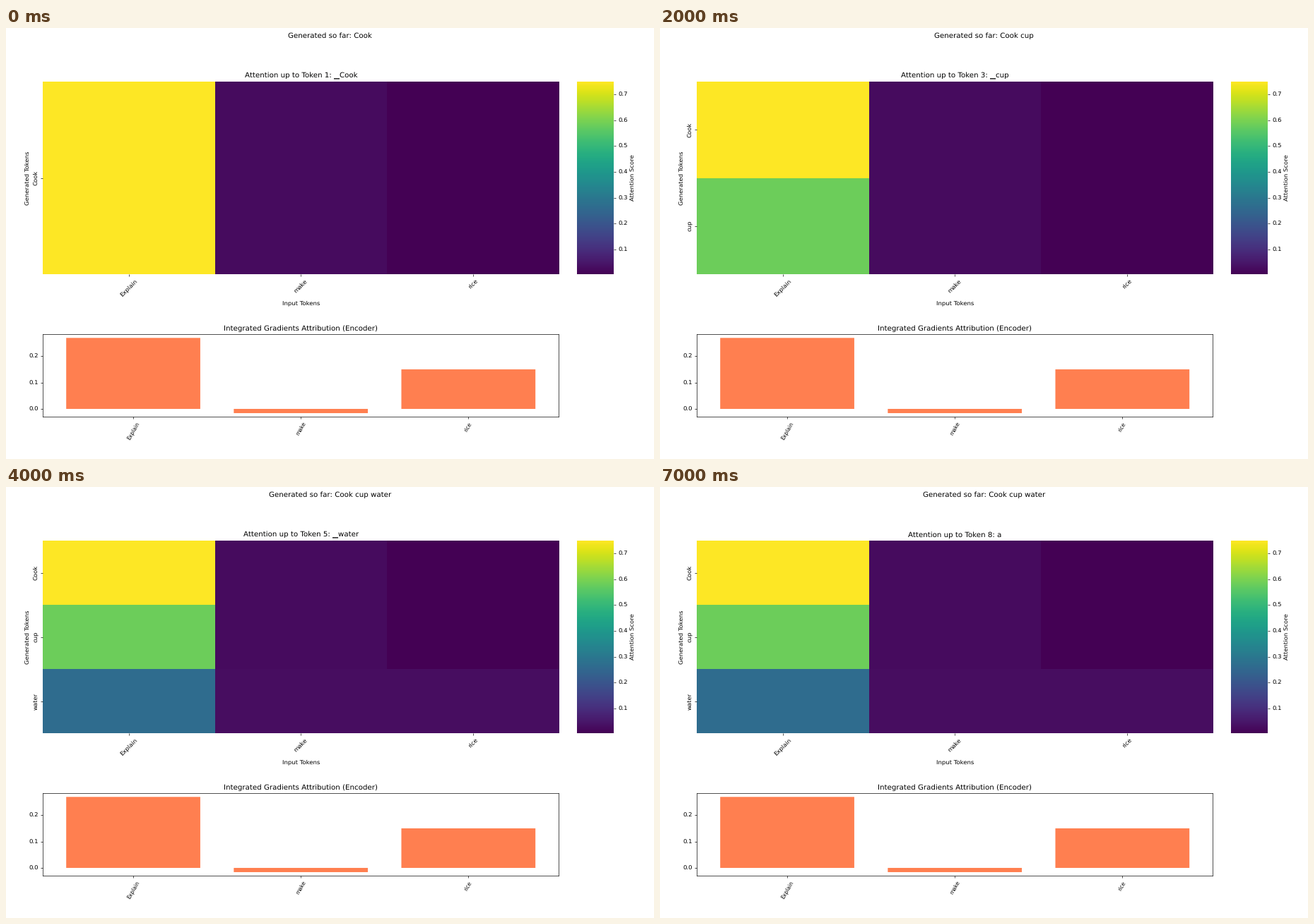
A matplotlib script that plays this animation: 917 by 611 pixels, repeating every 8000 ms.

```python
import numpy as np
import matplotlib.pyplot as plt
from matplotlib.animation import FuncAnimation
from matplotlib.cm import ScalarMappable
from matplotlib.colors import Normalize

W, H = 917, 611
DPI = 61.125

plt.rcParams["font.family"] = "DejaVu Sans"
plt.rcParams["text.hinting"] = "none"
fig = plt.figure(figsize=(W / DPI, H / DPI), dpi=DPI, facecolor="white")

WORDS = ["Explain", "make", "rice"]
TOKENS = ["▁Cook", "▁1", "▁cup", "▁of", "▁water", "▁in", "▁", "a"]
SCORES = {
    "Cook": [0.749, 0.0264, 0.0046],
    "cup": [0.581, 0.0264, 0.0046],
    "water": [0.265, 0.0293, 0.0293],
}
GRADIENTS = [0.2687, -0.016, 0.1497]
NORM = Normalize(0.0046, 0.749)


def add_axes(left, top, right, bottom):
    """Axes from pixel edges, measured from the top left."""
    return fig.add_axes([left / W, 1 - bottom / H,
                         (right - left) / W, (bottom - top) / H])


heat = add_axes(52, 76, 782.7, 349)
scale = add_axes(808, 76, 860, 349)
bars = add_axes(52, 434, 782.4, 551.3)
heading = fig.suptitle("", y=0.99)

colorbar = fig.colorbar(ScalarMappable(NORM, "viridis"), cax=scale,
                        ticks=np.arange(1, 8) / 10)
colorbar.outline.set_linewidth(0)
colorbar.set_label("Attention Score")

bars.bar(WORDS, GRADIENTS, color="coral", snap=False)
bars.set_title("Integrated Gradients Attribution (Encoder)")
bars.set_yticks([0, 0.1, 0.2])
bars.tick_params(axis="x", rotation=60, labelsize=9)


def update(step):
    seen = [t.strip("▁") for t in TOKENS[:step + 1]]
    rows = [word for word in seen if word in SCORES]

    heat.clear()
    heat.pcolormesh([SCORES[word] for word in rows],
                    cmap="viridis", norm=NORM)
    heat.invert_yaxis()
    heat.spines[:].set_visible(False)
    heat.set_xticks(np.arange(len(WORDS)) + 0.5, WORDS, rotation=45)
    heat.set_yticks(np.arange(len(rows)) + 0.5, rows,
                    rotation=90, va="center")
    heat.set_xlabel("Input Tokens")
    heat.set_ylabel("Generated Tokens")
    heat.set_title(f"Attention up to Token {step + 1}: {TOKENS[step]}")
    heading.set_text("Generated so far: " + " ".join(rows))


anim = FuncAnimation(fig, update, frames=len(TOKENS), interval=1000,
                     init_func=lambda: update(0), repeat=True,
                     repeat_delay=0, blit=False)
plt.show()
```
